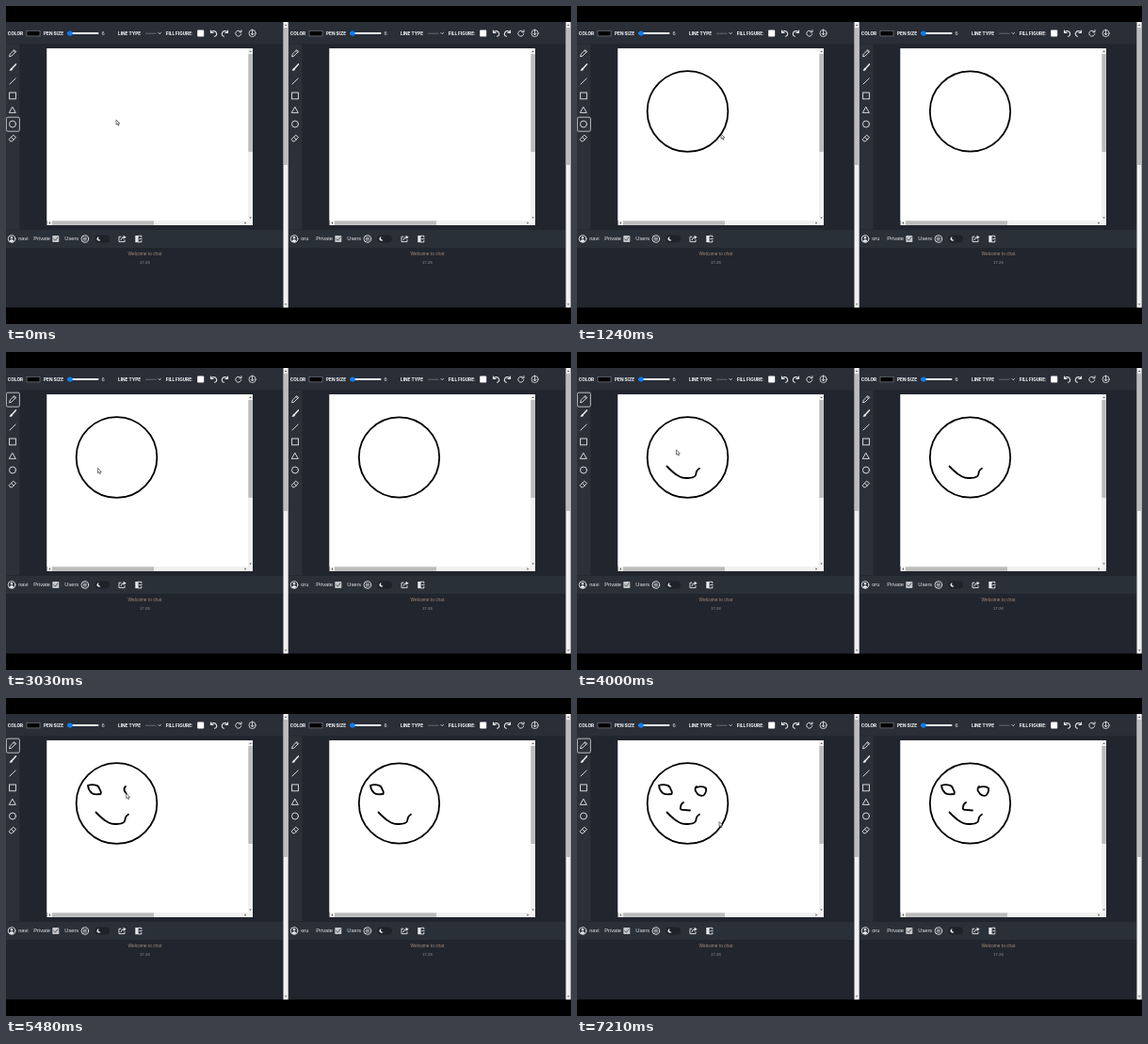
Recreate the animation shown at these times as an HTML page. Size 600x338 px, loop 7480 ms.

```html
<!DOCTYPE html>
<html lang="en">
<head>
<meta charset="utf-8">
<title>Shared drawing board</title>
<style>
  html, body { margin: 0; width: 100%; height: 100%; overflow: hidden; background: #000; }
  svg { display: block; width: 100vw; height: 100vh; }
  .caps { font: 800 4.7px Inter, sans-serif; fill: #e8eaec; }
  .label { font: 5.7px "Liberation Sans", sans-serif; fill: #e4e6e8; }
  .chat { font: 4.8px "Liberation Sans", sans-serif; fill: #a58b78; text-anchor: middle; }
  .time { font-size: 4.4px; fill: #91959b; }
  .icon { fill: none; stroke: #e8eaec; stroke-width: .9; stroke-linecap: round; stroke-linejoin: round; }
  .solid { fill: #e8eaec; stroke: none; }
  .track { fill: #f1f1f1; }
  .thumb { fill: #bcbcbc; }
  .arrow { fill: #555; }
  .ink { fill: none; stroke: #000; stroke-width: 1.8; stroke-linecap: round; stroke-linejoin: round; }
</style>
</head>
<body>
<svg viewBox="0 0 600 338" preserveAspectRatio="none">
  <defs>
    <g id="panel">
      <rect y="17" width="300" height="303.5" fill="#21252d"/>
      <rect y="17" width="294.5" height="23.5" fill="#292e37"/>
      <rect y="40.5" width="14.5" height="197" fill="#2b3139"/>
      <rect y="238" width="294.5" height="19" fill="#2a3038"/>

      <!-- drawing area with scrollbars -->
      <rect x="43.5" y="45" width="218.5" height="188" class="track"/>
      <rect x="43.5" y="45" width="213.5" height="183" fill="#fff"/>
      <rect x="257.4" y="51" width="4.4" height="104" class="thumb"/>
      <rect x="49" y="228.4" width="108" height="4.4" class="thumb"/>
      <path class="arrow" d="M258.3 49h2.6l-1.3-1.6zM258.3 224.5h2.6l-1.3 1.6zM47 229.3v2.6l-1.6-1.3zM253.5 229.3v2.6l1.6-1.3z"/>

      <!-- page scrollbar -->
      <rect x="294.5" y="17" width="5.2" height="303.5" class="track"/>
      <rect x="294.9" y="23" width="4.4" height="146" class="thumb"/>
      <path class="arrow" d="M295.8 21h2.6l-1.3-1.6zM295.8 316.5h2.6l-1.3 1.6z"/>

      <!-- top bar -->
      <g class="caps">
        <text x="1.8" y="30.8">COLOR</text>
        <text x="40" y="30.8">PEN SIZE</text>
        <text x="119" y="30.8">LINE TYPE</text>
        <text x="169.7" y="30.8">FILL FIGURE:</text>
      </g>
      <text x="101.6" y="31" class="label">6</text>
      <rect x="22" y="26.3" width="14" height="5.6" fill="#000" stroke="#777c84" stroke-width=".7"/>
      <rect x="65" y="28.1" width="33.5" height="2" rx="1" fill="#eceef0"/>
      <rect x="65" y="28.1" width="4" height="2" rx="1" fill="#0d7bf0"/>
      <circle cx="68" cy="29.1" r="2.7" fill="#0d7bf0"/>
      <path d="M148 29.2h11.5" stroke="#80858c" stroke-width=".7"/>
      <path class="icon" stroke-width=".7" d="M162 28.5l1.2 1.2 1.2-1.2"/>
      <rect x="203.2" y="25.6" width="7" height="7" rx=".8" fill="#fff"/>
      <g class="icon" style="stroke-width:1.1">
        <path id="undo" d="M217.5 26v2.5h2.6M217.6 28.3c1.4-2.2 4.6-2.3 5.7 0s-.2 3.8-1.8 4"/>
        <use href="#undo" transform="translate(453 0) scale(-1 1)"/>
        <path d="M249.4 27.6a3 3 0 1 0 .4 2.1M250 25.6v2.2h-2.2" stroke-width=".9"/>
      </g>
      <g class="icon">
        <circle cx="261.6" cy="29" r="3.6" stroke-width=".8"/>
        <path d="M261.6 25v5.6M260 29.2l1.6 1.6 1.6-1.6"/>
      </g>

      <!-- tools -->
      <g class="icon">
        <path d="M3.7 53.4l.5-2.2 4.6-4.6 1.8 1.8-4.6 4.6zM8 47.5l1.7 1.7"/>
        <path d="M10.4 61.9l-3.6 4" stroke-width="1.5"/>
        <path class="solid" d="M3.3 68.6c1.2-.4.8-2 2-2.7s2.2.4 1.7 1.5-2 1.7-3.7 1.2z"/>
        <path d="M4 83l6.2-6"/>
        <rect x="3.6" y="92" width="6.8" height="6.8" stroke-linejoin="miter"/>
        <path d="M7 107.6l3.3 5.8H3.7z"/>
        <circle cx="7" cy="125.5" r="3.5"/>
        <path d="M3.5 141.4l4.2-4.2 2.9 2.4-4.3 4.2H5zM5.5 139.4l2.8 2.5"/>
      </g>

      <!-- bottom bar -->
      <g class="icon">
        <circle cx="6" cy="247.5" r="3.8"/>
        <circle cx="6" cy="246.3" r="1.2" class="solid"/>
        <path class="solid" d="M3.6 250c.5-2.4 4.3-2.4 4.8 0q-2.4 1.8-4.8 0z"/>
      </g>
      <text x="29.2" y="249.4" class="label">Private</text>
      <rect x="49.3" y="244" width="7" height="7" rx=".8" fill="#c4c6c8"/>
      <path d="M50.8 247.6l1.5 1.6 2.7-3.4" class="icon" style="stroke:#4a4e54"/>
      <text x="62.3" y="249.4" class="label">Users</text>
      <g class="icon">
        <circle cx="83.8" cy="247.5" r="3.8"/>
        <path d="M82.2 246h3.2M82.2 247.5h3.2M82.2 249h3.2" stroke-width=".7"/>
      </g>
      <rect x="94.5" y="243.5" width="15.5" height="8" rx="4" fill="#1e2229"/>
      <path class="solid" d="M98.6 245.2a2.3 2.3 0 1 0 2 3.6a2.2 2.2 0 0 1-2-3.6z"/>
      <g class="icon">
        <path d="M122 245.2h-2v5.4h6v-2"/>
        <path d="M122 248.7q.2-3 3.3-3"/>
        <path class="solid" d="M124.6 243.7l3 2-3 2z"/>
        <path class="solid" d="M137.3 244h3.3v7.2h-3.3z"/>
        <path d="M140.6 244.3h3.2v1.5M140.6 250.9h3.2v-1.5M141.8 247.6h2.4"/>
      </g>

      <text x="147.4" y="265.4" class="chat">Welcome to chat</text>
      <text x="147.4" y="273.9" class="chat time">17:26</text>
    </g>
  </defs>

  <rect width="600" height="338" fill="#000"/>
  <use href="#panel"/>
  <use href="#panel" x="300"/>
  <text x="13.2" y="249.4" class="label">navi</text>
  <text x="313.2" y="249.4" class="label">oru</text>
  <rect id="focus" x=".4" width="14" height="15" rx="1.5" fill="none" stroke="#dfe1e4" stroke-width=".8"/>
  <g id="board"></g>
  <path id="cursor" d="M0 0v5.2l1.2-1 .9 2 .9-.4-.9-1.9h1.7z" fill="#fff" stroke="#222" stroke-width=".6" stroke-linejoin="round"/>
</svg>
<script>
const LOOP = 7480;
const CENTER = { x: 117.5, y: 112 };
const DRAG_START = 220, CIRCLE_COPY = 1240, PENCIL_CLICK = 2460;

// time, x, y of the pointer outside pen strokes
const MOVES = [
  [0, 117, 121], [190, 117.5, 112], [DRAG_START, 117.5, 112],
  [500, 136, 125.5], [760, 147, 133], [1000, 153, 136],
  [2060, 153, 136], [2400, 8, 51], [2500, 8, 51], [2810, 77, 98],
  [3030, 97.5, 123.5], [3090, 95.5, 121.5],
  [3650, 130, 123.8], [4000, 105.5, 104], [4300, 90, 92.5], [4380, 87, 93],
  [4860, 87, 93], [5110, 112, 97], [5380, 127, 94],
  [5790, 127, 95], [5940, 127, 95], [6260, 113, 111],
  [6670, 120, 119.5], [6820, 120, 119.5], [7210, 151, 131.5]
];

const STROKES = [
  { from: 3090, to: 3650, copy: 3690, d: "M95.5 121.5L99 125Q104 130 109 132.5Q113 134.6 119 133.8Q126 133.4 126.3 130Q126.7 125.5 130 123.8" },
  { from: 4380, to: 4860, copy: 4920, d: "M87 93Q87.5 98 91 101Q94 103.3 100.5 102Q101.5 100 99.5 97Q98.5 93.5 96 92.8Q91 91.5 87 93" },
  { from: 5380, to: 5790, copy: 5940, d: "M127 94Q125 95.5 125.7 98.5L128 102Q131 104.8 134.5 103.5Q137.8 100 137 96Q134 93 127 95" },
  { from: 6260, to: 6670, copy: 6850, d: "M113 111Q110.3 112.5 110 116Q109 119 112.5 118.8L120 119.5" }
];

const byId = id => document.getElementById(id);
const board = byId("board"), focusRing = byId("focus"), cursor = byId("cursor");

function ink(tag, attrs) {
  const el = document.createElementNS("http://www.w3.org/2000/svg", tag);
  el.setAttribute("class", "ink");
  for (const key in attrs) el.setAttribute(key, attrs[key]);
  return board.appendChild(el);
}
const show = (el, on) => el.setAttribute("visibility", on ? "visible" : "hidden");

const circle = ink("circle", { cx: CENTER.x, cy: CENTER.y });
const circleCopy = ink("circle", { cx: CENTER.x + 300, cy: CENTER.y, r: 42.7 });
for (const s of STROKES) {
  s.path = ink("path", { d: s.d });
  s.twin = ink("path", { d: s.d, transform: "translate(300 0)" });
  s.length = s.path.getTotalLength();
}

function pointerAt(t) {
  const stroke = STROKES.find(s => t >= s.from && t < s.to);
  if (stroke) {
    return stroke.path.getPointAtLength(stroke.length * (t - stroke.from) / (stroke.to - stroke.from));
  }
  const next = MOVES.findIndex(m => m[0] > t);
  if (next < 0) {
    const [, x, y] = MOVES[MOVES.length - 1];
    return { x, y };
  }
  const [t0, x0, y0] = MOVES[next - 1], [t1, x1, y1] = MOVES[next];
  const k = (t - t0) / (t1 - t0);
  return { x: x0 + (x1 - x0) * k, y: y0 + (y1 - y0) * k };
}

function draw(t) {
  const tip = pointerAt(t);
  cursor.setAttribute("transform", `translate(${tip.x} ${tip.y})`);
  focusRing.setAttribute("y", t < PENCIL_CLICK ? 118.2 : 43.2);

  const edge = pointerAt(Math.min(t, 1000));
  circle.setAttribute("r", Math.hypot(edge.x - CENTER.x, edge.y - CENTER.y));
  show(circle, t > DRAG_START);
  show(circleCopy, t >= CIRCLE_COPY);

  for (const s of STROKES) {
    const part = Math.min(1, (t - s.from) / (s.to - s.from));
    show(s.path, part > 0);
    show(s.twin, t >= s.copy);
    s.path.setAttribute("stroke-dasharray", part < 1 ? `${Math.max(0, part) * s.length} 999` : "none");
  }
}

const start = performance.now();
function tick() {
  draw((performance.now() - start) % LOOP);
  requestAnimationFrame(tick);
}
tick();
</script>
</body>
</html>
```
